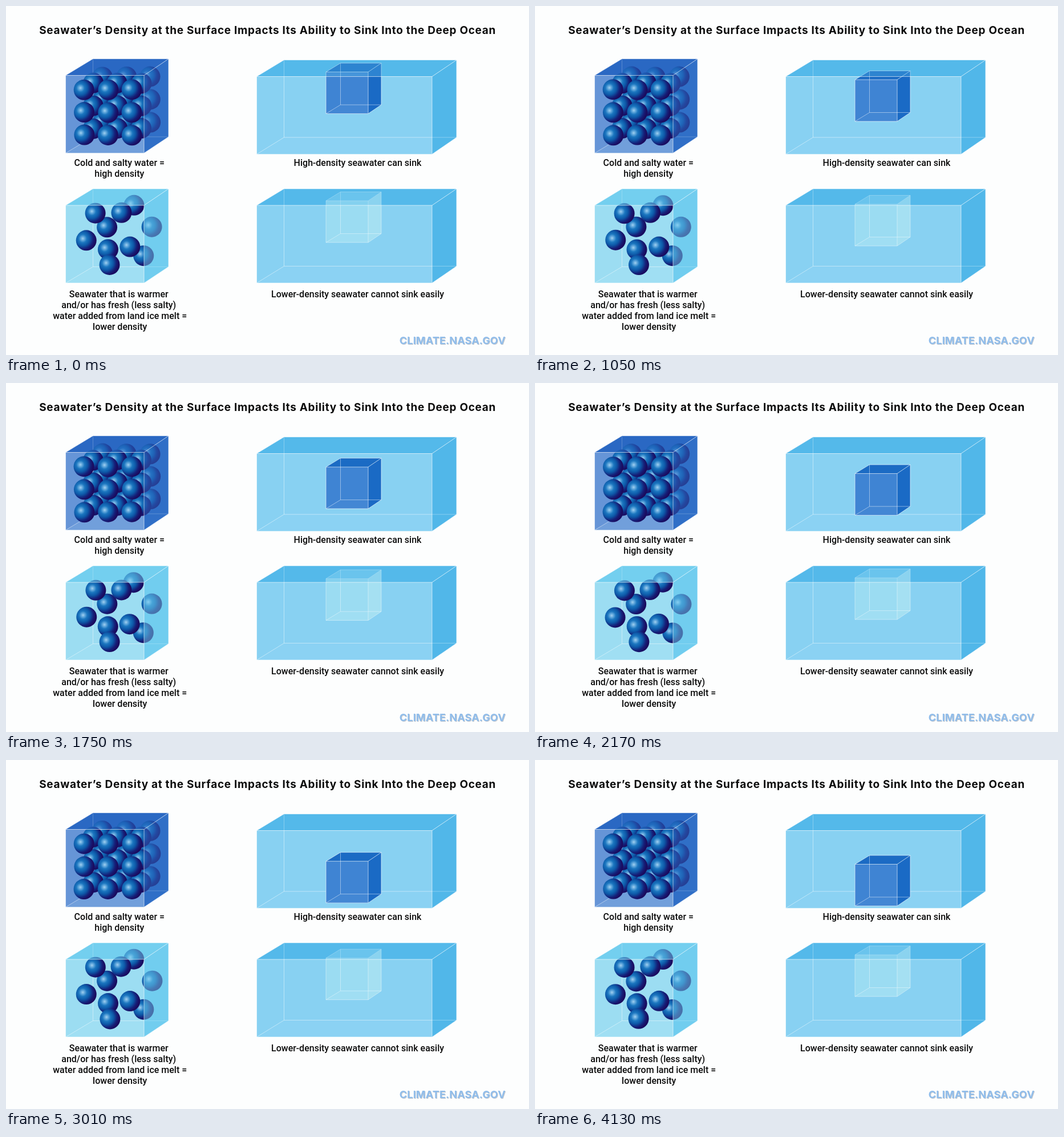
Animation, 917 px wide and 611 px high, one loop 4200 ms. Source, as an HTML page:

```html
<!DOCTYPE html>
<html lang="en">
<head>
<meta charset="utf-8">
<title>Seawater density</title>
<style>
html, body { margin: 0; width: 100%; height: 100%; overflow: hidden; background: #fdfefe; }
svg { display: block; width: 917px; height: 611px; }
text { text-anchor: middle; font: 500 16px Roboto, sans-serif; fill: #0c0c0c; }
.title { font: 700 19px Inter, sans-serif; letter-spacing: .68px; }
.site { font: 700 18px Inter, sans-serif; letter-spacing: .17px; fill: #90bdeb; }
.shade { fill: #c3c8ce; }
.edge { fill: none; stroke: #fff; stroke-opacity: .6; stroke-width: 1; }
.hidden { stroke-opacity: .45; }
#light .edge { stroke-opacity: .4; }
</style>
</head>
<body>
<svg id="stage" viewBox="0 0 917 611">
  <defs>
    <radialGradient id="shine" cx=".33" cy=".41" r=".72">
      <stop offset="0" stop-color="#a3d0ef"/>
      <stop offset=".1" stop-color="#6eb0e1"/>
      <stop offset=".28" stop-color="#1b76bf"/>
      <stop offset=".48" stop-color="#0d59a8"/>
      <stop offset=".7" stop-color="#152079"/>
      <stop offset=".85" stop-color="#1a0d62"/>
      <stop offset="1" stop-color="#170a5a"/>
    </radialGradient>
  </defs>
</svg>
<script>
const LOOP = 4200, STEP = 70, SINK_TIME = 3640, BOB_TIME = 1050;
const stage = document.getElementById('stage');
const poly = (points, fill, alpha = 1) =>
  `<polygon points="${points.join(' ')}" fill="${fill}" fill-opacity="${alpha}"/>`;
const label = (x, y, text, cls = '') => `<text x="${x}" y="${y}" class="${cls}">${text}</text>`;

// A box is a front rectangle and a back rectangle joined at the corners.
function box(front, back, colors, tint, inside) {
  const [x0, y0, x1, y1] = front, [u0, v0, u1, v1] = back;
  const top = [x0, y0, u0, v0, u1, v0, x1, y0];
  const side = [x1, y0, u1, v0, u1, v1, x1, y1];
  const floor = [x0, y1, u0, v1, x1, v1, x1, y1];
  const [frontFill, topFill, sideFill, floorFill] = colors;
  return poly([x0, y0, x1, y0, x1, y1, x0, y1], frontFill) +
    poly(floor, floorFill) + poly(top, topFill) + poly(side, sideFill) +
    `<path class="edge hidden" d="M${u0} ${v0}V${v1}H${u1}M${x0} ${y1}L${u0} ${v1}"/>` +
    inside + poly(top, topFill, tint) + poly(side, sideFill, tint) +
    `<path class="edge" d="M${x0} ${y0}H${x1}V${y1}H${x0}ZL${u0} ${v0}H${u1}V${v1}L${x1} ${y1}M${x1} ${y0}L${u1} ${v0}"/>`;
}

const ball = (x, y) => `<circle class="ball" cx="${x}" cy="${y}" r="18" fill="url(#shine)"/>`;

let packed = '';
for (const [x, y] of [[169, 124], [153, 135], [137, 146.5]])
  for (let row = 0; row < 3; row++)
    for (let col = 0; col < 3; col++)
      packed += ball(x + col * 42, y + row * 39.7);

const loose = [[224, 349], [256, 387], [241, 437], [177, 387], [157, 363],
  [202, 362], [141, 410], [179, 426], [217, 422], [182, 453]]
  .map(p => ball(...p)).join('');

const smallCube = (id, y, colors) => `<g id="${id}">` +
  box([561, y + 15.5, 635, y + 88.5], [586.5, y, 658, y + 73], colors, 0, '') + '</g>';

const tankColors = ['#88d1f2', '#54b9ea', '#51b7e9', '#8bd2f3'];
const tank = (y, cube) =>
  box([439.5, y + 29, 747, y + 165], [487.5, y, 790, y + 135.5], tankColors, .32, cube);
const jar = (y, colors, tint, balls) =>
  box([104.5, y + 29, 242, y + 165], [152.5, y, 285, y + 136.5], colors, tint, balls);

const lines = (x, y, rows) => rows.map((row, i) => label(x, y + i * 19.3, row)).join('');

stage.insertAdjacentHTML('beforeend',
  label(458.6, 49, 'Seawater’s Density at the Surface Impacts Its Ability to Sink Into the Deep Ocean', 'title') +
  jar(92.5, ['#6695d7', '#2b69c3', '#3070c7', '#719fdb'], .52, packed) +
  jar(320, ['#9cddf2', '#74cfef', '#71cdef', '#a0dff3'], .52, loose) +
  tank(94.5, smallCube('heavy', 100, ['#3f84d3', '#1b6bc4', '#1a6ac5', '#4387d4'])) +
  tank(320, smallCube('light', 325.5, ['#9bdcf2', '#74caee', '#a5e0f2', '#a0def3'])) +
  lines(198.8, 280, ['Cold and salty water =', 'high density']) +
  lines(199.7, 509.5, ['Seawater that is warmer&nbsp;', 'and/or has fresh (less salty)&nbsp;',
    'water added from land ice melt =', 'lower density']) +
  label(616.5, 280, 'High-density seawater can sink') +
  label(616.5, 509.5, 'Lower-density seawater cannot sink easily') +
  label(783.8, 592.5, 'CLIMATE.NASA.GOV', 'site shade') +
  label(782.8, 591.5, 'CLIMATE.NASA.GOV', 'site'));

const heavy = document.getElementById('heavy'), light = document.getElementById('light');
const balls = [...document.querySelectorAll('.ball')];
const ease = x => x * x * (3 - 2 * x);
const shift = (el, x, y) => el.setAttribute('transform', `translate(${x} ${y})`);

function draw(now) {
  const t = Math.floor(now % LOOP / STEP) * STEP;
  shift(heavy, 0, 67 * ease(Math.min(t / SINK_TIME, 1)));
  shift(light, 0, 6 * ease(1 - Math.abs(1 - t / BOB_TIME % 2)));
  // The balls tremble slightly, each with its own phase.
  balls.forEach((el, i) => {
    const a = t / LOOP * 2 * Math.PI;
    shift(el, .45 * Math.sin(a * (5 + i % 4) + i * 2.4), .4 * Math.cos(a * (6 + i % 3) + i * 1.7));
  });
  requestAnimationFrame(draw);
}
draw(performance.now());
</script>
</body>
</html>
```
